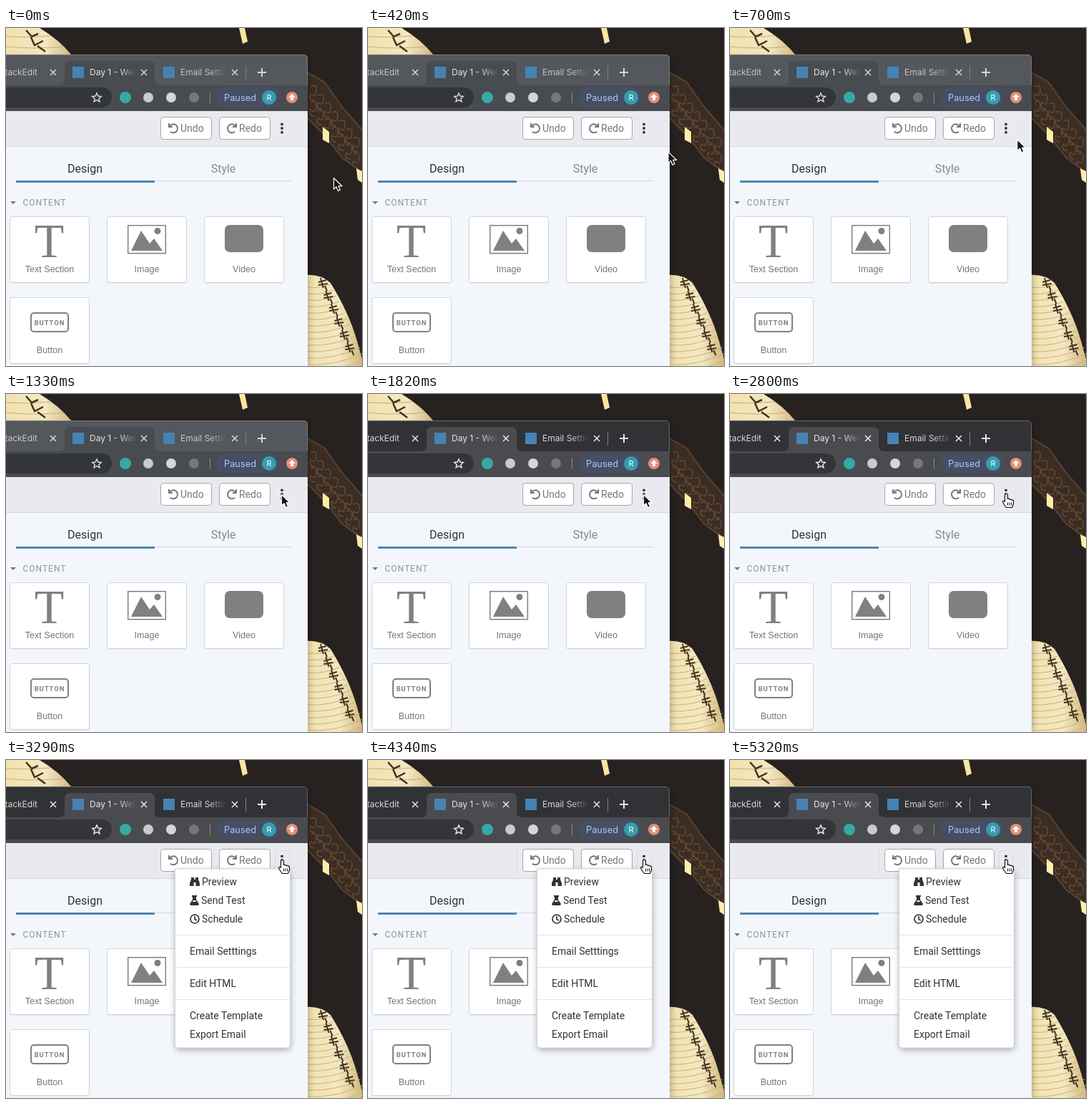
An HTML page for the animation above (5390 ms loop, 498x472 px).

```html
<!DOCTYPE html>
<html lang="en">
<head>
<meta charset="utf-8">
<title>Editor menu</title>
<style>
html, body { margin: 0; width: 100%; height: 100%; overflow: hidden; background: #272220; }
svg { display: block; font-family: Roboto, Arial, sans-serif; --frame: #54575c; --bar: #484b50; --rim: #7b7b7b; --ink: #c3c5c8; --glyph: #d5d7da; }
svg.focused { --frame: #303236; --bar: #494b4f; --rim: #64656a; --ink: #d6d8db; --glyph: #e6e8ea; }
.frame { fill: var(--frame); }
.bar { fill: var(--bar); }
.chrome text { fill: var(--ink); font: 12px Inter, Arial, sans-serif; }
.lines { fill: none; stroke: var(--glyph); stroke-width: 1.5; }
.card { fill: #fff; stroke: #cfd4da; }
.label { font: 12.6px "Liberation Sans", Arial, sans-serif; fill: #757575; text-anchor: middle; }
.btn { fill: #fff; stroke: #a5a5a9; }
.btnText { font-size: 14px; fill: #777; }
.menu text { font-size: 14px; fill: #333; }
.open, .menu, .hand { visibility: hidden; }
.opened .open, .opened .menu, .linked .hand { visibility: visible; }
.linked .arrow { visibility: hidden; }
</style>
</head>
<body>
<svg id="stage" width="498" height="472" viewBox="0 0 498 472">
  <defs>
    <linearGradient id="paper">
      <stop offset="0" stop-color="#f1e2ae"/><stop offset=".6" stop-color="#f3e8c2"/><stop offset="1" stop-color="#d3b87e"/>
    </linearGradient>
    <linearGradient id="fadeA" gradientUnits="userSpaceOnUse" x1="158" x2="183" y1="0" y2="0">
      <stop offset="0" stop-color="#fff"/><stop offset="1" stop-color="#000"/>
    </linearGradient>
    <linearGradient id="fadeB" gradientUnits="userSpaceOnUse" x1="284" x2="309" y1="0" y2="0">
      <stop offset="0" stop-color="#fff"/><stop offset="1" stop-color="#000"/>
    </linearGradient>
    <mask id="maskA"><rect x="110" y="45" width="73" height="34" fill="url(#fadeA)"/></mask>
    <mask id="maskB"><rect x="238" y="45" width="71" height="34" fill="url(#fadeB)"/></mask>
    <filter id="soft" x="-30%" y="-30%" width="160%" height="160%"><feGaussianBlur stdDeviation="5"/></filter>
    <path id="cross" d="M-4-4 4 4M4-4-4 4"/>
    <path id="turn" d="M-5-3A6 6 0 1 1-4.2 4.6M-6-7V-2H-1" fill="none" stroke="#777" stroke-width="2"/>
  </defs>

  <!-- Night backdrop -->
  <rect width="498" height="472" fill="#272220"/>
  <path d="M0 0H47Q74 16 92 38H0Z" fill="url(#paper)"/>
  <path d="M0 12Q30 14 62 11M0 26Q40 30 80 26" fill="none" stroke="#c8ad78"/>
  <path d="M28 3 36 12 45 8M35 13 40 24 52 18M44 25 55 33" fill="none" stroke="#44331f" stroke-width="2.5"/>
  <path d="M326 0H334L338 19 331 22Z" fill="#f7e5a3"/>
  <path d="M422 62 446 76 470 110 498 142V202L470 181 446 150 422 126Z" fill="#3b2d23"/>
  <g id="lattice" fill="none" stroke="#644b34" stroke-width="1.5"></g>
  <path d="M422 62 446 76 470 110 498 142M422 126 446 150 470 181 498 202" fill="none" stroke="#58432f" stroke-width="2"/>
  <path d="M443 138 452 145V161L443 156Z" fill="#ffeeaa"/>
  <path d="M490 196 498 200V216L492 212Z" fill="#ffeeaa"/>
  <path d="M418 345Q440 343 454 356Q480 398 491 437L498 462V472H418Z" fill="url(#paper)"/>
  <g id="ribs" fill="none" stroke="#cbb17b"></g>
  <g id="script" fill="none" stroke="#44331f" stroke-width="2"></g>

  <!-- Browser -->
  <path d="M-8 42H424V472H-8Z" filter="url(#soft)" opacity=".25"/>
  <g class="chrome">
    <path class="frame" d="M0 37H416Q422 37 422 43V116H0Z"/>
    <path d="M0 37.5H416Q421.5 37.5 421.5 43V116" fill="none" stroke="var(--rim)"/>
    <path class="bar" d="M0 80H74Q82 80 82 72V54Q82 46 90 46H200Q208 46 208 54V72Q208 80 216 80H422V116H0Z"/>
    <text x="44" y="66" text-anchor="end">StackEdit</text>
    <rect x="93" y="54" width="16" height="16" fill="#4682b4"/>
    <text x="117" y="66" mask="url(#maskA)" style="fill:#e4e6e8">Day 1 - Welcome</text>
    <rect x="220" y="54" width="16" height="16" fill="#4682b4"/>
    <text x="244" y="66" mask="url(#maskB)">Email Settings</text>
    <g class="lines">
      <use href="#cross" x="66" y="62"/><use href="#cross" x="193" y="62"/><use href="#cross" x="320" y="62"/>
      <path d="M352 62H364M358 56V68" stroke-width="2"/>
    </g>
    <path d="M335.5 53V72" stroke="#808388"/>
    <path d="M0 83H134A14 14 0 0 1 134 111H0Z" fill="#33353a"/>
    <path class="lines" d="M127 91 128.8 95.1 133.2 95.5 129.9 98.4 130.9 102.8 127 100.5 123.1 102.8 124.1 98.4 120.8 95.5 125.2 95.1Z"/>
    <circle cx="167" cy="97" r="8" fill="#35aaa5"/>
    <circle cx="199" cy="97" r="7" fill="#c8cbcf"/>
    <circle cx="231" cy="97" r="7" fill="#d5d6d6"/>
    <circle cx="263" cy="97" r="7" fill="#75777c"/>
    <path d="M285.5 90V105" stroke="#8a8d92"/>
    <rect x="294" y="83" width="88" height="28" rx="14" fill="#464e63"/>
    <text x="305" y="102" style="font-size:12.8px;fill:#a9c7f8">Paused</text>
    <circle cx="368" cy="97" r="10" fill="#369dae"/>
    <text x="368" y="101" text-anchor="middle" style="font-size:11px;fill:#fff">R</text>
    <circle cx="400" cy="97" r="8" fill="#e58c78"/>
    <path d="M400 92 405 97H402V101H398V97H395Z" fill="#fff"/>
  </g>

  <!-- Page -->
  <path d="M0 116H422V472H0Z" fill="#f3f7fc"/>
  <path d="M0 116H422V165H0Z" fill="#e9eaf0"/>
  <path d="M0 165.5H422" stroke="#d4d8df"/>
  <g class="open" fill="none" stroke="#dcdde5"><path d="M208.5 124V157"/><rect x="376.5" y="126.5" width="20" height="27" rx="2"/></g>
  <rect class="btn" x="216.5" y="124.5" width="71" height="31" rx="4"/>
  <rect class="btn" x="298.5" y="124.5" width="71" height="31" rx="4"/>
  <use href="#turn" x="234" y="140"/>
  <use href="#turn" transform="translate(316 140) scale(-1 1)"/>
  <text class="btnText" x="244" y="145">Undo</text>
  <text class="btnText" x="326" y="145">Redo</text>
  <g fill="#333"><circle cx="386" cy="134.3" r="1.9"/><circle cx="386" cy="140" r="1.9"/><circle cx="386" cy="145.7" r="1.9"/></g>
  <g font-size="16" text-anchor="middle">
    <text x="110.5" y="202" fill="#333">Design</text><text x="304" y="202" fill="#878b90">Style</text>
  </g>
  <path d="M208 213.5H400" stroke="#d3d8de"/>
  <path d="M14 214.5H208" stroke="#4d87b1" stroke-width="3"/>
  <path d="M6 242H14L10 246Z" fill="#777"/>
  <text x="23.5" y="248" font-size="12" letter-spacing="1" fill="#90959a">CONTENT</text>
  <g id="cards"></g>
  <text x="60.5" y="320" text-anchor="middle" fill="#808080" style="font:68px 'Liberation Serif',Times,serif">T</text>
  <g fill="#808080">
    <rect x="170.7" y="275.7" width="52.6" height="39" fill="none" stroke="#808080" stroke-width="1.5"/>
    <path d="M175 311 189 283 201 301 207 294 219 311Z"/>
    <circle cx="212" cy="283.5" r="4.5"/>
    <rect x="306" y="275" width="54" height="38" rx="7"/>
    <rect x="35" y="398" width="52" height="26" rx="4" fill="none" stroke="#808080" stroke-width="2"/>
    <text x="61" y="415" text-anchor="middle" font-size="9.5" font-weight="700" letter-spacing=".9">BUTTON</text>
  </g>

  <!-- Dropdown -->
  <g class="menu">
    <rect x="237" y="155" width="161" height="250" rx="5" opacity=".3" filter="url(#soft)"/>
    <path d="M236.5 152H397.5V397Q397.5 402 392.5 402H241.5Q236.5 402 236.5 397Z" fill="#fff" stroke="#d0d2d6"/>
    <path d="M237 244.5H397M237 289.5H397M237 334.5H397" stroke="#e1e3e6"/>
    <g fill="#333">
      <path d="M259 164H263V167H265V164H269V167L271 172V176H265.5V171H262.5V176H257V172L259 167Z"/>
      <path d="M260 189H267V191H266V195L270 201Q270 203 268 203H259Q257 203 257 201L261 195V191H260Z"/>
      <path d="M262 196H265L266 198H261Z" fill="#fff"/>
    </g>
    <g fill="none" stroke="#333" stroke-width="1.7"><circle cx="264" cy="222" r="6"/><path d="M264 218V222.5L267 224"/></g>
    <g id="items"></g>
  </g>

  <!-- Pointer, with its hot spot at 0,0 -->
  <g id="pointer" stroke-linejoin="round">
    <path class="arrow" d="M0 0V15.5L3.6 12.2 6 18 9 16.7 6.6 11.2H11.5Z" fill="#111" stroke="#fff" stroke-width="1.2"/>
    <g class="hand">
      <path d="M-1 10V1Q-1-1 1-1T3 1V6Q5 5 6 7Q8 6 9 8Q11 7 11 9V13L9 18H1L-2 14-4 10Q-3 7-1 10Z" fill="#fff" stroke="#111" stroke-width="1.2"/>
      <path d="M3 11V15M5.5 11V15M8 11V15" stroke="#111"/>
    </g>
  </g>
</svg>
<script>
const stage = document.getElementById("stage");
const pointer = document.getElementById("pointer");
const fill = (id, parts) => { document.getElementById(id).innerHTML = parts.join(""); };
const repeat = (count, make) => Array.from({ length: count }, (_, i) => make(i));

fill("cards", [[5, 263, "Text Section"], [141, 263, "Image"], [277, 263, "Video"], [5, 376, "Button"]].map(([x, y, name]) =>
  `<rect x="${x + .5}" y="${y + 1.5}" width="111" height="92" rx="3" fill="#d5d9df"/>
   <rect class="card" x="${x + .5}" y="${y + .5}" width="111" height="92" rx="3"/>
   <text class="label" x="${x + 56}" y="${y + 78}">${name}</text>`));

fill("items", [[274, 175, "Preview"], [273, 201, "Send Test"], [274, 227, "Schedule"], [257, 272, "Email Setttings"],
  [257, 317, "Edit HTML"], [257, 362, "Create Template"], [257, 388, "Export Email"]].map(([x, y, name]) =>
  `<text x="${x}" y="${y}">${name}</text>`));

// Two rows of scrolls along the carved beam
fill("lattice", repeat(14, i => {
  const x = 426 + (i >> 1) * 10, y = 82 + (i >> 1) * 12 + i % 2 * 22;
  return `<path d="M${x} ${y}q9-4 8 6t-8 4q-3 9 6 9"/>`;
}));
fill("ribs", repeat(14, i =>
  `<path d="M422 ${362 + i * 9}Q${438 + i * 2} ${364 + i * 9} ${455 + i * 3.7} ${358 + i * 8}"/>`));
// Brush marks down the lantern's edge
fill("script", repeat(6, i =>
  `<path d="M${437 + i * 7.5} ${355 + i * 18}l11-3m-8-3l4 14m-7-4l13-2m-4 3l3 7"/>`));

const LOOP = 5390, STEP = 70;
function draw() {
  const t = Math.floor(performance.now() % LOOP / STEP) * STEP;
  // The pointer slows down as it nears the menu button.
  const left = Math.max(0, 1 - t / 1260) ** 1.85;
  pointer.setAttribute("transform", `translate(${385.5 + 73 * left} ${140.5 + 69 * left})`);
  stage.classList.toggle("focused", t >= 1680);
  stage.classList.toggle("linked", t >= 2170);
  stage.classList.toggle("opened", t >= 3080);
  requestAnimationFrame(draw);
}
draw();
</script>
</body>
</html>
```
